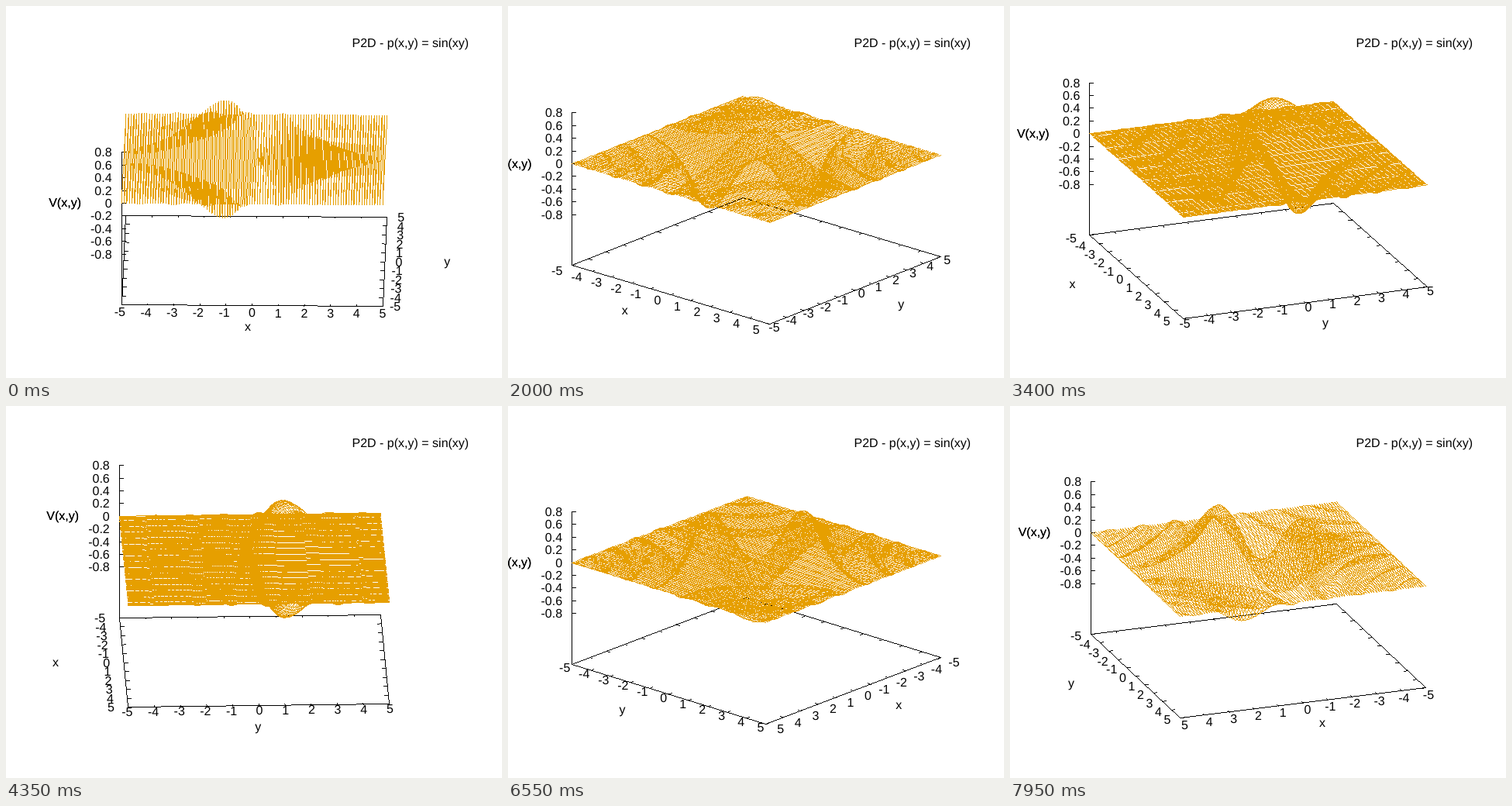
Write an HTML page with a canvas that moves like this. It is 640x480 px and loops after 8 s.

```html
<!DOCTYPE html>
<html lang="en">
<head>
<meta charset="utf-8">
<title>Rotating surface plot</title>
<style>
  html, body { margin: 0; width: 100%; height: 100%; overflow: hidden; background: #fff; }
  canvas { display: block; width: 640px; height: 480px; }
</style>
</head>
<body>
<canvas id="plot" width="640" height="480"></canvas>
<script>
const W = 640, H = 480;
const ctx = document.getElementById('plot').getContext('2d');
const image = ctx.createImageData(W, H);
const pixels = new Uint32Array(image.data.buffer);

// Colours as ABGR words
const WHITE = 0xffffffff, BLACK = 0xff000000, ORANGE = 0xff009fe6;

const N = 100, STEP = 10 / N;            // grid over [-5, 5] x [-5, 5]
const CENTER_X = 320.5, CENTER_Y = 329.05;
const UNIT = 33.7, TILT = Math.cos(70 * Math.PI / 180);
const Z_UNIT = 82, Z_BASE = -1.6, Z_TOP = 0.8, PEAK = 0.73;
const TICK = 5;

const surface = solvePoisson();
let sin = 0, cos = 1;

// Solves laplace(V) = sin(xy) with V = 0 on the border, by over-relaxation
function solvePoisson() {
  const v = Array.from({ length: N + 1 }, () => new Float64Array(N + 1));
  const omega = 2 / (1 + Math.sin(Math.PI / N));
  for (let pass = 0; pass < 350; pass++) {
    for (let i = 1; i < N; i++) {
      for (let j = 1; j < N; j++) {
        const source = Math.sin((i * STEP - 5) * (j * STEP - 5)) * STEP * STEP;
        const mean = (v[i - 1][j] + v[i + 1][j] + v[i][j - 1] + v[i][j + 1] - source) / 4;
        v[i][j] += omega * (mean - v[i][j]);
      }
    }
  }
  const top = Math.max(...v.map(row => Math.max(...row)));
  return v.map(row => row.map(z => z * PEAK / top));
}

function project(x, y, z = Z_BASE) {
  return [
    CENTER_X + UNIT * (x * cos + y * sin),
    CENTER_Y + UNIT * TILT * (x * sin - y * cos) - Z_UNIT * (z - Z_BASE)
  ];
}

// Hard-edged line, one pixel wide
function line([xa, ya], [xb, yb], color) {
  const x0 = Math.floor(xa), y0 = Math.floor(ya);
  const dx = Math.floor(xb) - x0, dy = Math.floor(yb) - y0;
  const count = Math.max(Math.abs(dx), Math.abs(dy)) || 1;
  for (let k = 0; k <= count; k++) {
    const x = Math.round(x0 + dx * k / count), y = Math.round(y0 + dy * k / count);
    if (x >= 0 && x < W && y >= 0 && y < H) pixels[y * W + x] = color;
  }
}

function tick([x, y], dx, dy) {
  line([x, y], [x + dx * TICK, y + dy * TICK], BLACK);
}

function drawAxes(zCorner) {
  const corners = [[-5, -5], [5, -5], [5, 5], [-5, 5]].map(c => project(...c));
  corners.forEach((c, i) => line(c, corners[(i + 1) % 4], BLACK));
  for (let n = -5; n <= 5; n++) {
    for (const side of [-1, 1]) {
      tick(project(n, 5 * side), -side * sin, side * TILT * cos);
      tick(project(5 * side, n), -side * cos, -side * TILT * sin);
    }
  }
  line(project(...zCorner), project(...zCorner, Z_TOP), BLACK);
  for (let n = -4; n <= 4; n++) tick(project(...zCorner, n / 5), 1, 0);
}

// One unbroken line: each row ends with a straight return to the next row's start
function drawSurface() {
  let last = null;
  for (let i = 0; i <= N; i++) {
    for (let j = 0; j <= N; j++) {
      const point = project(i * STEP - 5, j * STEP - 5, surface[i][j]);
      if (last) line(last, point, ORANGE);
      last = point;
    }
  }
}

function text(value, x, y, align = 'center') {
  ctx.textAlign = align;
  ctx.fillText(value, x, y);
}

// Labels beside the axis turn from centred to flush when it runs steeply
function tickLabel(n, [x, y], dx, dy, flush) {
  const align = !flush ? 'center' : dx > 0 ? 'left' : 'right';
  text(n < 0 ? String(n) : '\u00a0' + n, x + dx - 2, y + dy + 5.5, align);
}

function drawLabels(front, zCorner) {
  ctx.fillStyle = '#000';
  ctx.font = '16px "Liberation Sans", Arial, sans-serif';
  ctx.textRendering = 'geometricPrecision';
  text('P2D - p(x,y) = sin(xy)', 446.5, 53, 'left');

  for (let n = -5; n <= 5; n++) {
    tickLabel(n, project(n, 5 * front), front * 16 * sin, -front * 9.2 * cos, sin > 0.55);
    tickLabel(n, project(5, n), 11 * cos, 6 * sin, Math.abs(cos) > 0.9);
  }
  const xName = project(0, 7.5 * front);
  const yName = project(7.5, 0);
  text('x', xName[0] - 4, xName[1] + 4);
  text('y', yName[0] - 4, yName[1] + 4);

  for (let n = -4; n <= 4; n++) {
    const [x, y] = project(...zCorner, n / 5);
    text(String(n / 5), x - 12.5, y + 5.5, 'right');
  }
  const [zx, zy] = project(...zCorner, 0);
  for (let k = 0; k < 2; k++) text('V(x,y)', zx - 73, zy + 5);
}

function draw(degrees) {
  const angle = degrees * Math.PI / 180;
  sin = Math.sin(angle);
  cos = Math.cos(angle);
  const front = cos > 0 ? -1 : 1;        // side of y that faces the viewer
  const zCorner = [5 * front, -5];       // leftmost corner
  pixels.fill(WHITE);
  drawAxes(zCorner);
  drawSurface();
  ctx.putImageData(image, 0, 0);
  drawLabels(front, zCorner);
}

let shown = -1;
function tickFrame() {
  const step = Math.floor(performance.now() % 8000 / 50);
  if (step !== shown) draw(1 + (shown = step));
  requestAnimationFrame(tickFrame);
}
tickFrame();
</script>
</body>
</html>
```
